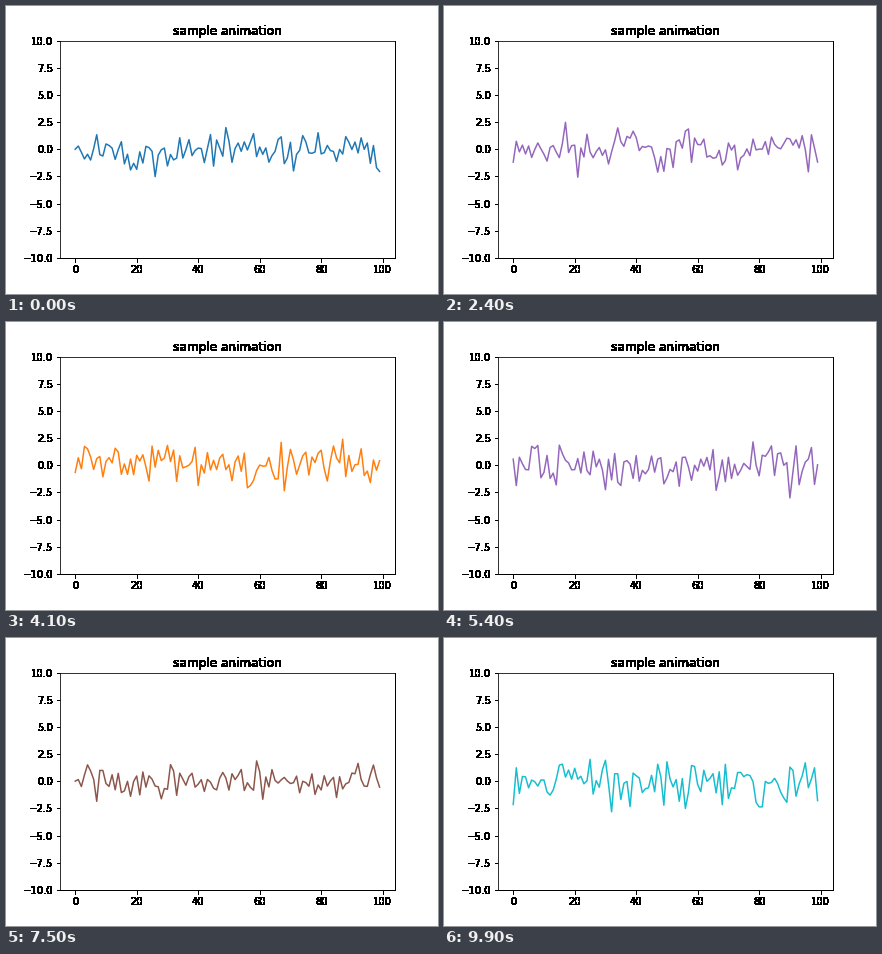
Write a matplotlib script that moves like this. It is 432 px wide and 288 px high and loops after 10000 ms.

```python
import numpy as np
import matplotlib.pyplot as plt
from matplotlib.animation import FuncAnimation

FRAMES = 100
POINTS = 100

plt.rcParams.update({"font.family": "DejaVu Sans", "font.size": 10})


def harden(fig):
    """Draw a transparent figure once; make every touched pixel opaque."""
    fig.canvas.draw()
    pixels = np.array(fig.canvas.buffer_rgba())
    pixels[..., 3] = np.where(pixels[..., 3] > 0, 255, 0)
    return pixels


fig = plt.figure(figsize=(6, 4), dpi=72, facecolor=(1, 1, 1, 0))
ax = fig.add_axes([0.125, 0.125, 0.775, 0.755], facecolor="white")
title = ax.set_title("sample animation", fontsize=12)
ax.set_xlim(-4.95, 103.95)
ax.set_ylim(-10, 10)
ax.set_xticks(range(0, 101, 20))
ax.set_yticks(np.arange(-10, 10.1, 2.5))

# The static chart becomes a backdrop with hard-edged labels.
backdrop = harden(fig)
fig.set_facecolor("white")
title.set_visible(False)
ax.set_axis_off()
fig.figimage(backdrop, origin="upper", zorder=-1)

noise = np.random.default_rng(7).standard_normal((FRAMES, POINTS))
line, = ax.plot(noise[0], color="C0", linewidth=1.5)


def update(i):
    line.set_ydata(noise[i])
    line.set_color(f"C{i % 10}")
    return line,


anim = FuncAnimation(fig, update, frames=FRAMES, interval=100,
                     repeat=True, repeat_delay=0)
plt.show()
```
